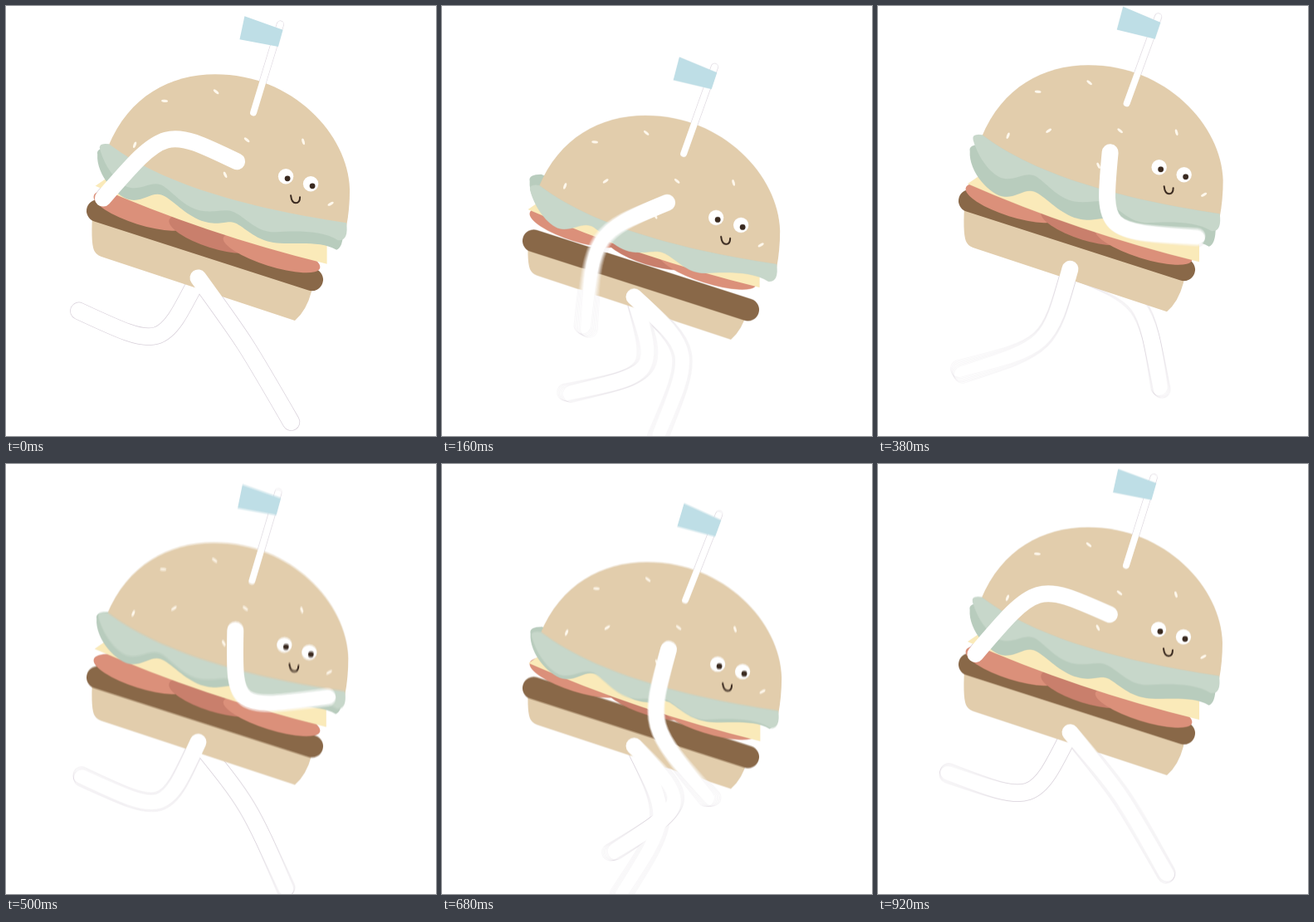
An HTML page with a canvas that plays this animation: 518 px wide and 518 px high, repeating every 940 ms.

```html
<!DOCTYPE html>
<html lang="en">
<head>
<meta charset="utf-8">
<title>Running burger</title>
<style>
  html, body { margin: 0; height: 100%; overflow: hidden; background: #fff; }
  canvas { display: block; }
</style>
</head>
<body>
<canvas id="stage" width="518" height="518"></canvas>
<script>
const SIZE = 518, LOOP = 940, STEP = 20, SHUTTER = 8, SAMPLES = 6;
const TURN = 2 * Math.PI, RAD = Math.PI / 180;
const stage = document.getElementById('stage').getContext('2d');
const layer = document.createElement('canvas');
layer.width = layer.height = SIZE;
const ctx = layer.getContext('2d');

// Leg angles from straight down, in eight even steps through one stride
const THIGH = [36, 58, 18, -10, -27, -3, 55, 75];
const SHIN = [30, -12, -38, -62, -115, -92, -48, 0];

const BUN = new Path2D('M123 170C148 109 198 83 252 83C345 83 412 155 414 222Q414 245 410 266Q250 250 123 172Z');
const LETTUCE = new Path2D('M124 167Q111 165 113 173C119 196 137 219 152 220S178 210 190 218S218 247 240 248S266 243 280 252S305 274 325 273S380 270 400 283Q413 284 410 262C330 250 200 225 124 167Z');
const LETTUCE_SHADE = new Path2D('M110 180C108 205 135 234 152 235S178 222 192 231S222 258 243 262S268 256 282 266S308 286 330 287S380 284 398 295Q406 292 406 272L250 230L124 172Q108 172 110 180Z');
const CHEESE = new Path2D('M124 203L108 214Q240 272 387 308L387 285Z');
const PATTY = new Path2D('M110.5 250L368.5 333');
const BASE = new Path2D('M104 254Q102 290 107 297Q110 302 118 304L348 380Q362 368 368 345V336Z');
const MOUTH = new Path2D('M343 229Q344 238 349 238Q354 238 354 231');
const POLE = new Path2D('M0 0V-111');
const FLAG = new Path2D('M-44 -108L5 -105.5L5.5 -84.5L-41.5 -79.3Z');

// Two bounces per loop; peak is the time of the lowest point
function bob(time, mean, reach, peak) {
  const wave = (order, start) => Math.cos(order * TURN * (time - start) / (LOOP / 2));
  return mean + reach * (wave(1, peak) + 0.12 * wave(2, 125));
}

// Smooth closed curve through evenly spaced values
function cycle(values, time) {
  const n = values.length, pos = (time / LOOP + 1) * n, i = Math.floor(pos), s = pos - i;
  const [a, b, c, d] = [-1, 0, 1, 2].map(k => values[(i + k) % n]);
  return b + s / 2 * (c - a + s * (2 * a - 5 * b + 4 * c - d + s * (3 * (b - c) + d - a)));
}

function limb(x, y, upper, lower, upperAngle, lowerAngle) {
  const kneeX = x + upper * Math.sin(upperAngle * RAD);
  const kneeY = y + upper * Math.cos(upperAngle * RAD);
  const path = new Path2D();
  path.moveTo(x, y);
  path.bezierCurveTo(kneeX, kneeY, kneeX, kneeY,
    kneeX + lower * Math.sin(lowerAngle * RAD), kneeY + lower * Math.cos(lowerAngle * RAD));
  return path;
}

const leg = (y, time) => limb(231.5, y, 97, 110, cycle(THIGH, time), cycle(SHIN, time));

function swingArm(x, y, time) {
  const phase = TURN * time / LOOP;
  const upper = -44 - 57 * Math.cos(phase - 0.09) - 15 * Math.cos(2 * phase);
  return limb(x, y, 96, 114, upper, 29 - 70 * Math.cos(phase));
}

function at(x, y, draw) {
  ctx.save();
  ctx.translate(x, y);
  draw();
  ctx.restore();
}

// Parts higher in the stack drift back a little as they drop
const dropped = (y, draw) => at(-0.14 * y, y, draw);

function fill(path, color) {
  ctx.fillStyle = color;
  ctx.fill(path);
}

function stroke(path, width, color) {
  ctx.lineWidth = width;
  ctx.strokeStyle = color;
  ctx.stroke(path);
}

function ellipse(x, y, rx, ry, degrees, color) {
  const path = new Path2D();
  path.ellipse(x, y, rx, ry, degrees * RAD, 0, TURN);
  fill(path, color);
}

const seed = (x, y, angle) => ellipse(x, y, 4, 1.6, angle, '#fff8ec');

function eye(x, y) {
  ellipse(x, y, 9.2, 9.2, 0, '#fff');
  ellipse(x + 2, y + 2.5, 3.4, 3.4, 0, '#3a2a20');
}

function drawTopBun() {
  fill(BUN, '#e2cdac');
  fill(LETTUCE, '#c7d7ca');
  seed(191, 115, 5);
  seed(253, 104, 40);
  seed(290, 162, 40);
  seed(358, 164, 75);
  seed(264, 204, 65);
  seed(391, 239, -30);
  seed(204, 162, -35);
  seed(155, 168, -70);
  eye(337, 206);
  eye(367, 215);
  stroke(MOUTH, 2, '#3a2a20');
}

function drawTomatoes() {
  ellipse(163, 246, 60, 17, 17.5, '#db907a');
  ellipse(250, 274, 56, 17, 17.5, '#c97f6c');
  ellipse(320, 297, 61, 16, 17.5, '#db907a');
}

function drawScene(time) {
  const bunY = bob(time, 16, 31, 150);
  const baseY = bob(time, 4, 18, 130);
  const lean = 19.5 + 3 * Math.cos(TURN * (time - 275) / (LOOP / 2));
  const frontLeg = leg(328.5 + baseY, time);
  const backLeg = leg(328.5 + baseY, time + LOOP / 2);
  const arm = swingArm(278 - 0.14 * bunY, 188 + bunY, time);
  const onPole = draw => at(298 - 0.14 * bunY, 129 + bunY, () => {
    ctx.rotate(lean * RAD);
    draw();
  });

  ctx.fillStyle = '#fff';
  ctx.fillRect(0, 0, SIZE, SIZE);
  ctx.lineCap = 'round';

  // Faint rims lie under the body, so they show only on the white ground
  for (const path of [backLeg, frontLeg, arm]) stroke(path, 21.4, '#d8d0da');
  onPole(() => stroke(POLE, 9, '#d8d0da'));
  stroke(backLeg, 20, '#fff');

  at(0, baseY, () => fill(BASE, '#e2cdac'));
  at(0, bob(time, 7, 25, 140), () => stroke(PATTY, 27, '#896848'));
  at(0, bob(time, 5, 16, 130), drawTomatoes);
  dropped(bob(time, 14, 16, 165), () => fill(CHEESE, '#faeab9'));
  dropped(bob(time, 11, 18.5, 160), () => fill(LETTUCE_SHADE, '#b8ccbd'));
  dropped(bunY, drawTopBun);
  onPole(() => {
    stroke(POLE, 8, '#fff');
    fill(FLAG, '#bedee6');
  });
  stroke(frontLeg, 20, '#fff');
  stroke(arm, 20, '#fff');
}

function render() {
  const time = Math.floor(performance.now() % LOOP / STEP) * STEP;
  const count = time ? SAMPLES : 1; // the first picture is sharp
  for (let i = 0; i < count; i++) {
    drawScene(time + ((i + 0.5) / count - 0.5) * SHUTTER);
    stage.globalAlpha = 1 / (i + 1);
    stage.drawImage(layer, 0, 0);
  }
  requestAnimationFrame(render);
}
render();
</script>
</body>
</html>
```
